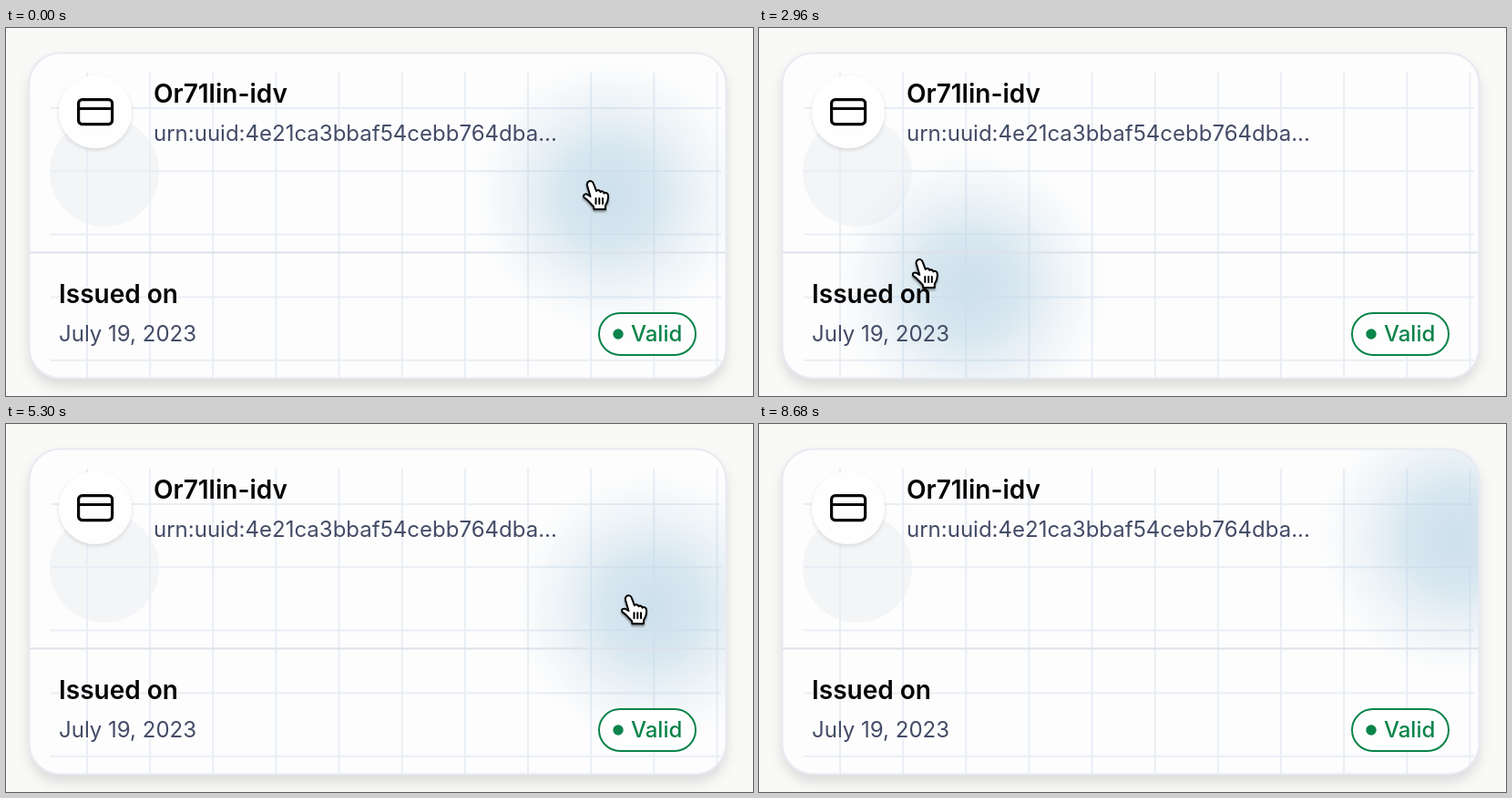
An HTML page for the animation above (8700 ms loop, 820x404 px).

```html
<!DOCTYPE html>
<html lang="en">
<head>
<meta charset="utf-8">
<title>Credential card</title>
<style>
  html, body { margin: 0; width: 100%; height: 100%; overflow: hidden; background: #f9f9f8; }
  svg { display: block; width: 820px; height: 404px; }
  text { font-family: Inter, sans-serif; font-size: 24px; fill: #434b66; }
  .title { font-size: 28px; font-weight: 600; fill: #050505; }
  .status { font-weight: 500; fill: #0a844a; }
</style>
</head>
<body>
<svg viewBox="0 0 820 404">
  <defs>
    <clipPath id="cardClip"><rect x="25.5" y="27.5" width="765" height="357" rx="34"/></clipPath>
    <radialGradient id="glowFill">
      <stop offset="0" stop-color="#cde0ec"/>
      <stop offset=".35" stop-color="#cde0ec" stop-opacity=".78"/>
      <stop offset=".7" stop-color="#d3e3ee" stop-opacity=".33"/>
      <stop offset="1" stop-color="#dbe7f0" stop-opacity="0"/>
    </radialGradient>
    <radialGradient id="glowMask">
      <stop offset=".3" stop-color="#fff"/>
      <stop offset="1" stop-color="#000"/>
    </radialGradient>
    <mask id="spot" maskUnits="userSpaceOnUse" x="0" y="0" width="820" height="404">
      <circle class="glow" r="150" fill="url(#glowMask)"/>
    </mask>
    <filter id="cardShadow" x="-10%" y="-10%" width="120%" height="130%">
      <feDropShadow dx="0" dy="8" stdDeviation="7" flood-color="#000" flood-opacity=".13"/>
    </filter>
    <filter id="softShadow" x="-30%" y="-30%" width="160%" height="170%">
      <feDropShadow dx="0" dy="2" stdDeviation="2" flood-color="#000" flood-opacity=".13"/>
    </filter>
    <filter id="handShadow" x="-30%" y="-30%" width="170%" height="170%">
      <feDropShadow dx="0" dy="2" stdDeviation="1.3" flood-color="#000" flood-opacity=".4"/>
    </filter>
  </defs>

  <rect x="25.5" y="27.5" width="765" height="357" rx="34" fill="#fdfdfd" filter="url(#cardShadow)"/>
  <g clip-path="url(#cardClip)">
    <circle cx="108" cy="158" r="60" fill="#f4f5f7"/>
    <circle class="glow" r="150" fill="url(#glowFill)"/>
    <path class="grid" stroke="#e9eef5" stroke-width="2"/>
    <g mask="url(#spot)"><path class="grid" stroke="#c3dbea" stroke-opacity=".8" stroke-width="2"/></g>
    <path d="M25 246.5H791" stroke="#dde2ea" stroke-width="2"/>
  </g>
  <rect x="25.5" y="27.5" width="765" height="357" rx="34" fill="none" stroke="#e8eaf2" stroke-width="2"/>

  <circle cx="98" cy="92" r="40" fill="#fefefe" filter="url(#softShadow)"/>
  <g fill="none" stroke="#050505" stroke-width="3.2">
    <rect x="79.6" y="78.6" width="37" height="27" rx="4"/>
    <path d="M79 88.5H117"/>
  </g>

  <text class="title" x="162" y="82">Or71lin-idv</text>
  <text x="162" y="124">urn:uuid:4e21ca3bbaf54cebb764dba...</text>
  <text class="title" x="58" y="302">Issued on</text>
  <text x="58" y="344">July 19, 2023</text>

  <rect x="651" y="313" width="106" height="46" rx="23" fill="#fefefe" stroke="#0a844a" stroke-width="2"/>
  <circle cx="672" cy="336" r="5.7" fill="#0a844a"/>
  <text class="status" x="686" y="344">Valid</text>

  <g id="hand" filter="url(#handShadow)" stroke="#000" stroke-width="2" stroke-linejoin="round" stroke-linecap="round">
    <path fill="#fff" d="M7 3C9 1 12 2 13 5L16 13C17 11 20 12 20.5 14C22 12.5 24 13.5 24.5 15.5C26 14 29 15 29 18C29.5 23 28 26 26 29V33H13.5L13 30C10 27 6 22 2.5 20C1 17 4 15.5 6.5 17L9.5 19L6 7C5.5 5 6 4 7 3Z"/>
    <path fill="none" d="M15.5 21V27M19.3 21V27M23 21V27"/>
  </g>
</svg>
<script>
  const LOOP = 8700;
  const TAU = 2 * Math.PI;
  const ORBIT = { x: 400, y: 190, rx: 310, ry: 110 };
  const GLOW_LAG = 23;
  const CARD_EXIT = 735;

  // The pointer sweeps clockwise round the card: time, x, y, full turns so far
  const stops = [
    [0, 632, 166, -1],
    [1140, 516, 289, 1],
    [2260, 110, 202, 2],
    [3520, 543, 100, 3],
    [4500, 690, 95, 3],
    [5900, 427, 259, 4],
    [8680, 840, 128, 6]
  ].map(([t, x, y, turns]) => {
    const u = (x - ORBIT.x) / ORBIT.rx, v = (y - ORBIT.y) / ORBIT.ry;
    const angle = (Math.atan2(v, u) + TAU) % TAU;
    return { t, angle: angle + turns * TAU, radius: Math.hypot(u, v) };
  });
  const last = stops.length - 1;

  const rate = i => (stops[i + 1].angle - stops[i].angle) / (stops[i + 1].t - stops[i].t);

  // Angular speed at a stop: starts at rest and never turns back
  function speed(i) {
    if (i === 0) return 0;
    if (i === last) return rate(last - 1);
    const a = rate(i - 1), b = rate(i);
    return Math.min((a + b) / 2, 3 * a, 3 * b);
  }

  function pointer(time) {
    const t = Math.max(0, Math.min(time, stops[last].t));
    let i = 0;
    while (i < last - 1 && t >= stops[i + 1].t) i++;
    const a = stops[i], b = stops[i + 1];
    const span = b.t - a.t;
    const u = (t - a.t) / span, v = 1 - u;
    const ease = u * u * (3 - 2 * u);
    const angle = a.angle + (b.angle - a.angle) * ease
      + span * u * v * (v * speed(i) - u * speed(i + 1));
    const radius = a.radius + (b.radius - a.radius) * ease;
    return {
      x: ORBIT.x + ORBIT.rx * radius * Math.cos(angle),
      y: ORBIT.y + ORBIT.ry * radius * Math.sin(angle)
    };
  }

  const hand = document.getElementById('hand');
  const glows = document.querySelectorAll('.glow');

  let grid = '';
  for (let i = 0; i < 11; i++) grid += `M${89 + i * 69.15} 49V385`;
  for (let i = 0; i < 5; i++) grid += `M49 ${88 + i * 69.2}H785`;
  document.querySelectorAll('.grid').forEach(el => el.setAttribute('d', grid));

  function draw(time) {
    const now = pointer(time);
    const before = pointer(time - GLOW_LAG);
    hand.setAttribute('transform', `translate(${now.x} ${now.y})`);
    hand.style.visibility = now.x > 785 ? 'hidden' : 'visible';
    for (const glow of glows) {
      glow.setAttribute('cx', Math.min(before.x, CARD_EXIT) + 30);
      glow.setAttribute('cy', before.y + 18);
    }
  }

  const start = performance.now();
  function tick() {
    draw((performance.now() - start) % LOOP);
    requestAnimationFrame(tick);
  }
  tick();
</script>
</body>
</html>
```
